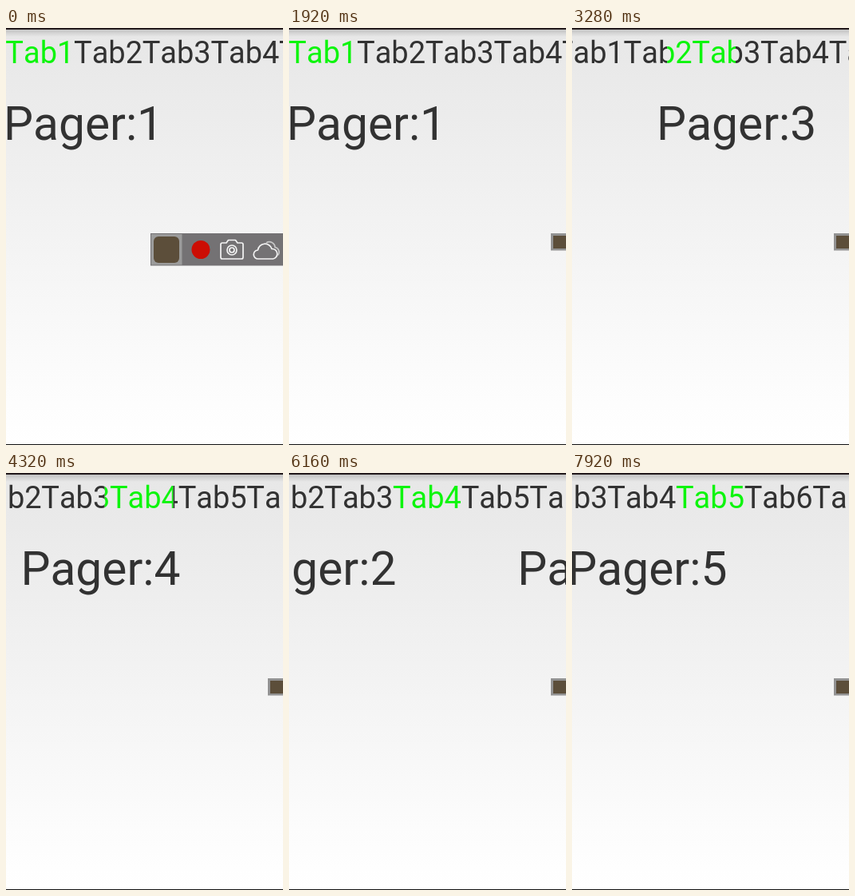
Animation of 347x522 px, one loop 8 s. Source, as an HTML page:

```html
<!DOCTYPE html>
<html lang="en">
<head>
<meta charset="utf-8">
<title>Tabbed pager</title>
<style>
html, body { margin: 0; width: 100%; height: 100%; overflow: hidden; background: #fff; }
svg { display: block; width: 347px; height: 522px; }
text { font-family: Roboto, sans-serif; font-kerning: none; fill: #323232; white-space: pre; }
.tabs text { font-size: 38px; }
.on text { fill: #0df50d; }
#pages text { font-size: 58.7px; }
.line { fill: none; stroke: #f4f4f4; stroke-width: 1.7; stroke-linejoin: round; }
</style>
</head>
<body>
<svg viewBox="0 0 347 522">
  <defs>
    <linearGradient id="bg" x2="0" y2="1">
      <stop offset="0" stop-color="#e7e7e7"/>
      <stop offset=".5" stop-color="#f3f3f3"/>
      <stop offset=".85" stop-color="#fcfcfc"/>
      <stop offset="1" stop-color="#fff"/>
    </linearGradient>
    <linearGradient id="shade" x2="0" y2="1">
      <stop offset="0" stop-color="#000" stop-opacity=".16"/>
      <stop offset="1" stop-color="#000" stop-opacity="0"/>
    </linearGradient>
    <clipPath id="dimClip"><path id="dimArea" clip-rule="evenodd"/></clipPath>
    <clipPath id="onClip"><rect id="onArea" y="0" width="85.7" height="70"/></clipPath>
  </defs>
  <rect width="347" height="522" fill="url(#bg)"/>
  <rect y="2" width="347" height="9" fill="url(#shade)"/>
  <g id="strip">
    <g class="tabs" clip-path="url(#dimClip)"></g>
    <g class="tabs on" clip-path="url(#onClip)"></g>
  </g>
  <g id="pages"></g>
  <g id="panel">
    <rect x="181" y="257" width="166" height="40.5" fill="#747274"/>
    <rect x="182" y="258" width="38.5" height="38.5" fill="#9b9b9b"/>
    <rect x="185" y="261" width="32" height="33" rx="6" fill="#5c4e3a"/>
    <circle cx="244" cy="277.5" r="11.5" fill="#cc0d03"/>
    <g class="line">
      <path d="M271 269h5l2.500-3.500h9l2.500 3.500h5q2 0 2 2v16q0 2-2 2h-24q-2 0-2-2v-16q0-2 2-2z"/>
      <circle cx="283" cy="278" r="6"/>
      <circle cx="283" cy="278" r="3"/>
      <path d="M316 289a5.500 5.500 0 0 1-.5-11a9 9 0 0 1 17.500-1.500a6.300 6.300 0 0 1 1.500 12.500z"/>
      <path d="M326 269a7 7 0 0 1 11 5.500a6 6 0 0 1 3.500 10" stroke-opacity=".65"/>
    </g>
  </g>
  <g id="mini">
    <rect x="328" y="257" width="19" height="21.500" fill="#929292"/>
    <rect x="331" y="260" width="16" height="16" fill="#5c4e3a"/>
  </g>
  <rect width="347" height="2" fill="#231a1c"/>
  <rect y="521" width="347" height="1" fill="#111"/>
</svg>
<script>
const LOOP = 8000, STEP = 80, TAB = 85.7, PITCH = 352, WIDTH = 347;
const DRAG = 350, SETTLE = 500, REACH = 0.45, SCROLL = 260, LAG = 25;

// swipes: [start, from page]; taps: [start, from, to, duration]
const swipes = [[1930, 0], [2843, 1], [3710, 2], [6782, 3], [7914, 4]];
const taps = [[5269, 3, 1, 420], [6145, 1, 3, 490]];

const $ = id => document.getElementById(id);
const clamp = (v, lo = 0, hi = 1) => Math.min(hi, Math.max(lo, v));
const easeOut = u => 1 - (1 - u) ** 3;

function addText(parent, x, y, str) {
  const el = document.createElementNS("http://www.w3.org/2000/svg", "text");
  el.setAttribute("x", x);
  el.setAttribute("y", y);
  el.textContent = str;
  parent.append(el);
}

for (let i = 0; i < 9; i++) {
  document.querySelectorAll(".tabs").forEach(g => addText(g, i * TAB - 0.7, 44.2, "Tab" + (i + 1)));
  addText($("pages"), i * PITCH - 3, 140, "Pager:" + (i + 1));
}

function swipePart(dt) {
  if (dt < DRAG) return REACH * dt / DRAG;
  return REACH + (1 - REACH) * easeOut(clamp((dt - DRAG) / SETTLE));
}

const events = [
  ...swipes.map(([at, from]) => ({ at, from, to: from + 1 })),
  ...taps.map(([at, from, to, dur]) => ({ at, from, to, dur }))
].sort((a, b) => a.at - b.at);

const current = t => events.filter(e => e.at <= t).pop();

function pageAt(t) {
  const e = current(t);
  if (!e) return 0;
  const dt = t - e.at;
  const part = e.dur ? easeOut(clamp(dt / e.dur)) : swipePart(dt);
  return e.from + (e.to - e.from) * part;
}

function markAt(t) {
  const e = current(t);
  return e && e.dur ? e.to : pageAt(t - LAG);
}

const centred = i => Math.max(0, (i + 0.5) * TAB - WIDTH / 2);

function scrollAt(t) {
  const e = current(t);
  if (!e) return 0;
  if (e.dur) return centred(e.to);
  const u = clamp((t - e.at - DRAG) / SCROLL);
  const a = centred(e.from), b = centred(e.to);
  return a + (b - a) * Math.sin(u * Math.PI / 2);
}

function shift(el, x) {
  el.setAttribute("transform", `translate(${x.toFixed(2)} 0)`);
}

function draw(t) {
  const mark = markAt(t) * TAB;
  shift($("strip"), -scrollAt(t));
  shift($("pages"), -pageAt(t) * PITCH);
  $("onArea").setAttribute("x", mark);
  $("dimArea").setAttribute("d", `M-9 0H${mark}V70H-9zM${mark + TAB} 0H900V70H${mark + TAB}z`);
  shift($("panel"), 166 * clamp((t - 40) / 640));
  $("mini").style.display = t >= 720 ? "" : "none";
}

const begin = performance.now();
function tick() {
  const t = (performance.now() - begin) % LOOP;
  draw(Math.floor(t / STEP) * STEP);
  requestAnimationFrame(tick);
}
draw(0);
requestAnimationFrame(tick);
</script>
</body>
</html>
```
